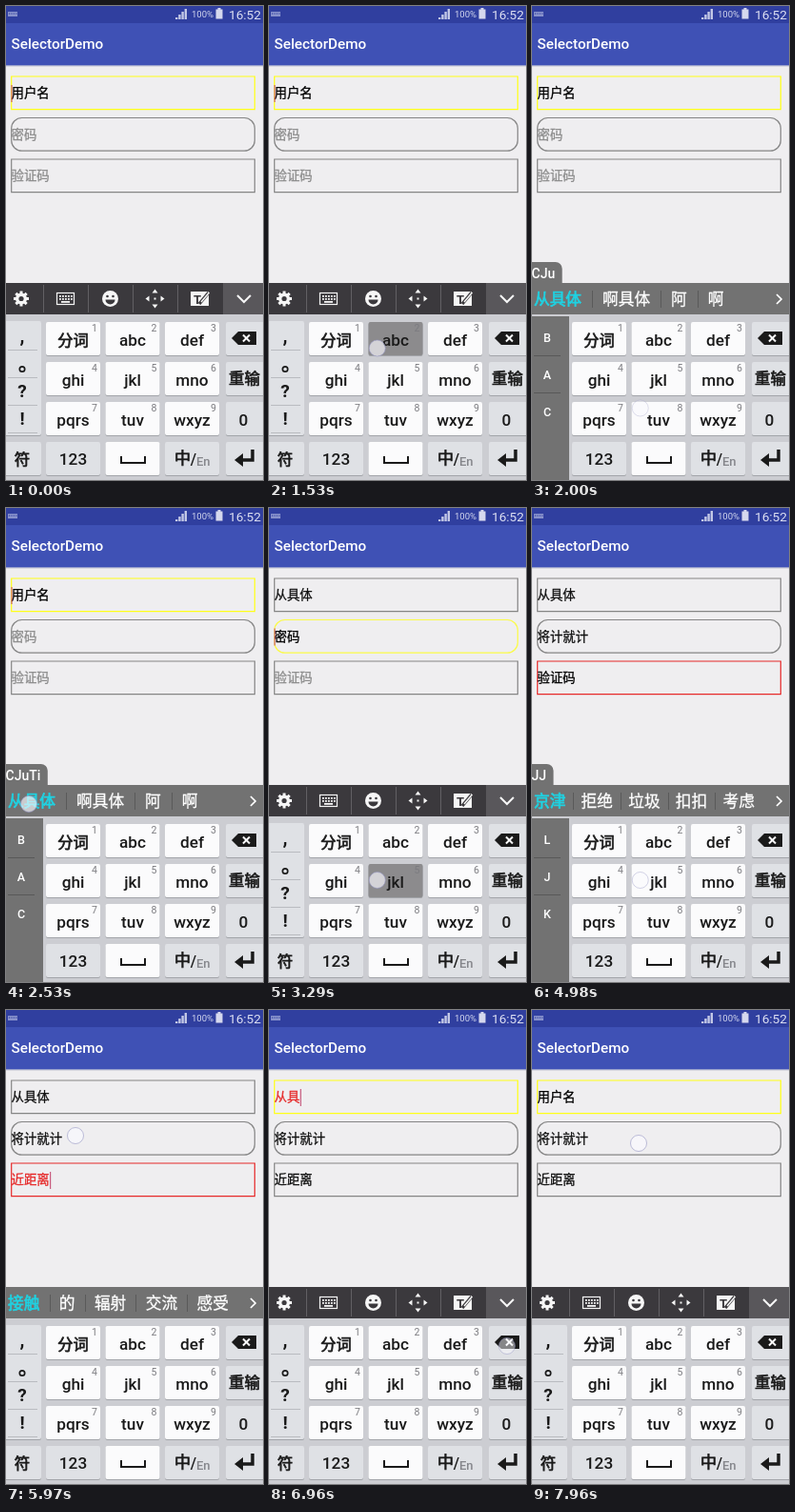
Write an HTML page with a canvas that moves like this. It is 270 px wide and 498 px high and loops after 8 s.

```html
<!DOCTYPE html>
<html lang="zh">
<head>
<meta charset="utf-8">
<style>
html, body { margin: 0; width: 100%; height: 100%; overflow: hidden; background: #eee }
canvas { display: block }
</style>
</head>
<body>
<canvas id="stage" width="270" height="498"></canvas>
<script>
const g = document.getElementById('stage').getContext('2d');
const LOOP = 8000, DELAY = 90, HOLD = 200;
const INK = '#1a1a1a', BAR = '#727272', RED = '#e62a2a', CURSOR = '#c0406a', GREY = '#dfe1e5', WHITE = '#fbfbfc';

const fields = [
  { hint: '用户名', color: '#ffff18', r: 0 },
  { hint: '密码', color: '#fbfb48', r: 11 },
  { hint: '验证码', color: RED, r: 0 }
];
const labels = '分词 abc def ghi jkl mno pqrs tuv wxyz'.split(' ');
const sideLetters = { C: 'BAC', J: 'LJK' };
const nextWords = ['接触', '的', '辐射', '交流', '感受'];

const keyX = i => 42 + i % 3 * 62.5;
const keyY = i => 332 + Math.floor(i / 3) * 42;
const mix = (a, b, k) => a + (b - a) * k;

// The script: every touch shows a dot, and changes the state a moment later.
const touches = [], changes = [];
function touch(time, x, y, change) {
  touches.push({ time, x, y });
  changes.push({ time: time + DELAY, change });
}
function focusOn(time, field, x, y) {
  touch(time, x, y, s => Object.assign(s, { focus: field, words: null, letters: '' }));
}
function type(time, gap, letters, words) {
  [...letters].forEach((letter, n) => {
    const i = labels.findIndex(label => label.includes(letter.toLowerCase()));
    // The thumb lands between the key and its resting place.
    const x = mix(keyX(i) + 28, 95, .5), y = mix(keyY(i) + 17, 391, .25);
    touch(time + n * gap, x, y, s => { s.letters += letter; s.words = words; });
  });
}
function pick(time, word) {
  touch(time, 24, 311, s => { s.values[s.focus] = word; s.letters = ''; s.words = nextWords; });
}
function erase(time) {
  touch(time, 250, 353, s => {
    if (!s.values[s.focus]) return false;
    s.values[s.focus] = s.values[s.focus].slice(0, -1);
  });
}

focusOn(310, 1, 120, 135);
focusOn(740, 2, 120, 178);
focusOn(1180, 0, 110, 92);
type(1520, 170, 'CJuTi', ['从具体', '啊具体', '阿', '啊']);
pick(2480, '从具体');
focusOn(2880, 1, 110, 133);
type(3260, 147, 'JJJJi', ['将计就计', '离开了', '健康快乐']);
pick(4120, '将计就计');
focusOn(4380, 2, 100, 178);
type(4640, 220, 'JJ', ['京津', '拒绝', '垃圾', '扣扣', '考虑']);
type(5200, 0, 'J', ['近距离', '急急急', '看看']);
pick(5630, '近距离');
focusOn(5890, 1, 73, 132);
focusOn(6390, 0, 49, 84);
for (let n = 0; n < 4; n++) erase(6850 + 250 * n);
focusOn(7920, 1, 112, 140);

function stateAt(t) {
  const s = { focus: 0, values: ['', '', ''], letters: '', words: null, edited: 0 };
  for (const { time, change } of changes) {
    if (time > t) break;
    const typing = s.letters;
    if (change(s) !== false && (!s.letters || s.letters === typing)) s.edited = time;
  }
  return s;
}

function rect(x, y, w, h, color) {
  g.fillStyle = color;
  g.fillRect(x, y, w, h);
}
function round(x, y, w, h, r, color) {
  g.beginPath();
  g.roundRect(x, y, w, h, r);
  g.fillStyle = color;
  g.fill();
}
function poly(points, color, width) {
  g.beginPath();
  for (let i = 0; i < points.length; i += 2) g.lineTo(points[i], points[i + 1]);
  if (width) { g.lineWidth = width; g.strokeStyle = color; g.stroke(); }
  else { g.fillStyle = color; g.fill(); }
}
function dot(x, y, r, color, to = 7) {
  g.beginPath();
  g.arc(x, y, r, 0, to);
  g.fillStyle = color;
  g.fill();
}
function outline(color, width) {
  g.lineWidth = width;
  g.strokeStyle = color;
  g.stroke();
}
function text(s, x, y, size, color = INK, align = 'left', weight = 400) {
  g.font = `${weight} ${size}px Roboto, "Noto Sans CJK SC", "Noto Sans CJK", sans-serif`;
  g.textAlign = align;
  g.fillStyle = color;
  g.fillText(s, x, y);
  // Chinese glyphs get a thin outline to stand in for a medium weight.
  if (/[^\x00-\x7f]/.test(s)) {
    g.lineWidth = weight > 400 ? .7 : .3;
    g.strokeStyle = color;
    g.strokeText(s, x, y);
  }
  return g.measureText(s).width;
}
const keyText = (s, x, y, size = 17.2) => text(s, x, y, size, INK, 'center', 500);

function drawHeader() {
  rect(0, 0, 270, 498, '#efeef0');
  rect(0, 0, 270, 18, '#303f9f');
  rect(0, 18, 270, 44, '#3f51b5');
  rect(0, 62, 270, 1, '#979fcb');
  rect(0, 63, 270, 1, '#d8d8e0');
  rect(2, 6, 10, 5, '#8791cb');
  for (let i = 0; i < 4; i++) {
    rect(3 + i * 2.4, 7.5, 1.2, 1, '#303f9f');
    rect(178 + i * 3.2, 12 - i * 3, 2.4, 2 + i * 3, '#c3c8e6');
  }
  text('100%', 195, 12, 9.5, '#d2d6ee');
  rect(222.5, 2, 3, 2, '#d5d8ee');
  rect(220.5, 3.5, 7, 10, '#d5d8ee');
  text('16:52', 234, 14, 13.6, '#dcdff2');
  text('SelectorDemo', 5.5, 45, 15.3, '#fff', 'left', 500);
}

function drawFields(t, { focus, values, edited }) {
  fields.forEach((field, i) => {
    const y = 74 + 43.5 * i, focused = i === focus, value = values[i];
    g.beginPath();
    g.roundRect(5.7, y, 255.6, 34.7, field.r);
    outline(focused ? field.color : '#858585', 1.2);
    const ink = value ? (focused ? RED : '#111') : focused ? '#000' : '#8c8c8c';
    const width = text(value || field.hint, 5.5, y + 22.3, 13.4, ink);
    if (focused && (t - edited) % 1000 < 500) rect(value ? 6 + width : 5.5, y + 9, 1, 18, CURSOR);
  });
}

function key(x, y, w, h, fill, t) {
  const down = touches.some(p => t >= p.time && t < p.time + DELAY &&
    p.x > x && p.x < x + w && p.y > y && p.y < y + h);
  round(x, y + 1, w, h, 2, '#a2a4a9');
  round(x, y, w, h, 2, down ? '#8c8b8d' : fill);
}

function drawKeys(t) {
  rect(0, 324, 270, 174, '#cccdd2');
  for (let i = 0; i < 12; i++) {
    const x = keyX(i), y = keyY(i);
    key(x, y, 57, 35, i < 9 || i === 10 ? WHITE : GREY, t);
    if (i % 3 === 0) key(231, y, 42, 35, GREY, t);
    if (i > 8) continue;
    keyText(labels[i], x + 28.5, y + 24.5, i ? 17.2 : 16.2);
    text(i + 1, x + 51, y + 10, 10.5, '#7c7c80', 'center');
  }
  keyText('123', 70.5, 482);
  poly([121, 473, 121, 480, 146, 480, 146, 473], INK, 2);
  keyText('中', 185.5, 481, 17);
  keyText('/', 197, 482, 16);
  text('En', 200, 483, 13, '#85868b', 'left', 500);

  poly([237, 349, 244, 342, 263, 342, 263, 356, 244, 356], INK);
  poly([249, 345.5, 256, 352.5], WHITE, 2);
  poly([256, 345.5, 249, 352.5], WHITE, 2);
  keyText('重输', 250.5, 397, 16.4);
  keyText('0', 249.5, 440.5);
  poly([259, 466, 259, 477, 246, 477], INK, 3.5);
  poly([240, 477, 249, 470, 249, 484], INK);
}

function drawSide(t, letters) {
  if (letters) {
    rect(0, 326, 39, 172, BAR);
    [...sideLetters[letters[0]]].forEach((c, i) => {
      text(c, 16, 353 + 39 * i, 12.5, '#fff', 'center', 500);
      if (i) rect(2, 328 + 39 * i, 28, 1, '#585858');
    });
    return;
  }
  key(-3, 331, 40, 120, GREY, t);
  for (let i = 0; i < 4; i++) rect(2, 361 + 29 * i, 31, 1, '#b9bbc0');
  text(',', 17, 353, 20, INK, 'center', 700);
  g.beginPath();
  g.arc(17, 381.5, 2.7, 0, 7);
  outline(INK, 1.7);
  text('?', 17, 411, 19, INK, 'center', 700);
  text('!', 17, 440, 19, INK, 'center', 700);
  key(-3, 458, 40, 35, GREY, t);
  keyText('符', 17, 482, 16.4);
}

function drawToolbar() {
  const dark = '#3b393d', light = '#f6f6f6', y = 307.5;
  rect(0, 291, 270, 33, dark);
  rect(228, 291, 42, 33, '#59575b');
  for (let i = 0; i < 4; i++) rect(39 + 47 * i, 293, 1, 29, '#626064');

  for (let i = 0; i < 8; i++) {
    const c = Math.cos(i * Math.PI / 4), s = Math.sin(i * Math.PI / 4);
    poly([16 + 4 * c, y + 4 * s, 16 + 8 * c, y + 8 * s], light, 3);
  }
  dot(16, y, 6, light);
  dot(16, y, 2.6, dark);

  g.lineWidth = 1.2;
  g.strokeStyle = light;
  g.strokeRect(53.5, 301.5, 18, 12);
  for (let i = 0; i < 10; i++) rect(56 + i % 5 * 3, 304 + 3 * Math.floor(i / 5), 1.8, 1.8, light);
  rect(58, 310, 9, 1.8, light);

  dot(109.5, y, 8.5, light);
  for (const side of [-3, 3]) dot(109.5 + side, 305, 1.3, dark);
  dot(109.5, 308.5, 5, dark, Math.PI);

  for (let i = 0; i < 4; i++) {
    g.save();
    g.translate(156.5, y);
    g.rotate(i * Math.PI / 2);
    poly([10, 0, 6, 3, 6, -3], light);
    g.restore();
  }
  rect(155.5, 306.5, 2, 2, light);

  rect(194, 300, 19, 15, light);
  text('T', 201, 313, 13, dark, 'center', 700);
  poly([203, 313, 213, 301], dark, 3.5);
  poly([205, 311, 213.5, 301], light, 1.5);
  poly([243, 304, 250, 311, 257, 304], light, 2);
}

function drawSuggestions({ letters, words }) {
  if (letters) {
    g.font = '500 14px Roboto, sans-serif';
    round(0, 269, g.measureText(letters).width + 7, 24, [0, 7, 0, 0], BAR);
    text(letters, -0.5, 286, 14, '#fff', 'left', 500);
  }
  rect(0, 291, 270, 33, BAR);
  const size = 16.7, spare = 232 - size * words.join('').length;
  const gap = Math.min(22, spare / (words.length - 1));
  let x = 2;
  words.forEach((word, i) => {
    if (i) rect(Math.round(x - gap / 2), 299, 1, 18, '#5a5a5a');
    x += gap + text(word, x, 314, size, i ? '#fff' : '#1fd2e2', 'left', i ? 400 : 500);
  });
  poly([257, 303, 262, 308, 257, 313], '#fff', 1.7);
}

function drawTouches(t) {
  for (const { time, x, y } of touches) {
    const left = time + HOLD - t;
    if (t < time || left <= 0) continue;
    g.globalAlpha = Math.min(1, left / 120);
    dot(x, y, 8.5, 'rgba(250,250,255,.65)');
    outline('rgba(150,150,195,.6)', 1);
    g.globalAlpha = 1;
  }
}

function draw(t) {
  const state = stateAt(t);
  drawHeader();
  drawFields(t, state);
  drawKeys(t);
  drawSide(t, state.letters);
  if (state.words) drawSuggestions(state);
  else drawToolbar();
  drawTouches(t);
}

const begin = performance.now();
function tick() {
  draw((performance.now() - begin) % LOOP);
  requestAnimationFrame(tick);
}
tick();
</script>
</body>
</html>
```
